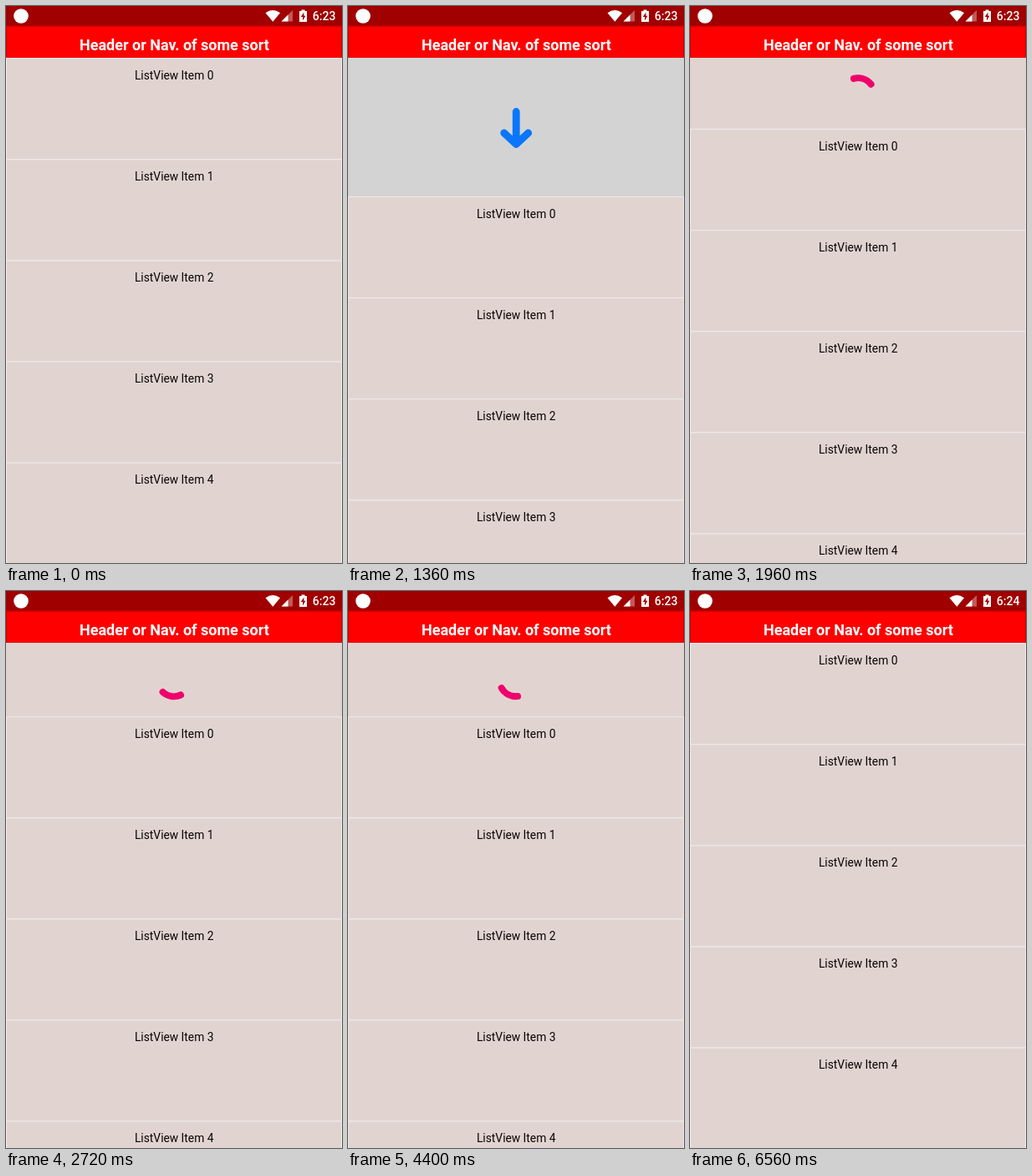
Animation, 402 px wide and 667 px high, one loop 6.6 s. Source, as an HTML page:

```html
<!DOCTYPE html>
<html lang="en">
<head>
<meta charset="utf-8">
<title>Pull to refresh</title>
<style>
  html, body { margin: 0; width: 100%; height: 100%; overflow: hidden; background: #e1d4d0; }
  svg { display: block; width: 402px; height: 667px; font-family: Roboto, "Open Sans", sans-serif; }
  .item rect { fill: #e1d4d0; stroke: #f1ecea; }
  .item text { font-size: 13.8px; text-anchor: middle; fill: #0a0404; }
  .spinner { fill: none; stroke: #ee006c; stroke-width: 8; stroke-linecap: round; }
  .arrow { fill: none; stroke: #0a76fc; stroke-width: 8.8; stroke-linecap: round; stroke-linejoin: round; }
</style>
</head>
<body>
<svg viewBox="0 0 402 667">
  <rect id="backdrop" width="402" height="667"/>
  <path id="arrow" class="arrow" d="M0-20V18M-14.5 5.5L0 19L14.5 5.5"/>
  <path id="spinner" class="spinner"/>
  <g id="list"></g>

  <rect width="402" height="62" fill="#d00000"/>
  <rect x="1" y="25" width="400" height="36.5" fill="#ff0000"/>
  <rect width="402" height="23.5" fill="#a00000"/>
  <text x="201.4" y="53.3" font-size="18" font-weight="700" text-anchor="middle" fill="#fff">Header or Nav. of some sort</text>

  <g fill="#fff">
    <circle cx="18" cy="12" r="8.8"/>
    <path d="M310.5 8.2Q319.3 1.8 328 8.2L319.3 18.8Z"/>
    <path d="M343 5V18.5H329.5Z" opacity=".35"/>
    <path d="M337.5 10.5V18.5H329.5Z"/>
    <path d="M351 6H353.5V4.5H357.5V6H360V19H351Z"/>
    <path d="M356.4 7.5L352.8 13H355V17.4L358.4 11.8H356.4Z" fill="#a00000"/>
    <text id="clock" x="366.8" y="17.2" font-size="14" font-weight="500"></text>
  </g>
</svg>
<script>
const LOOP = 6600;
const LIST_TOP = 62.2;
const ROW = 121.1;
const REFRESH_START = 1480;
const REFRESH_END = 6200;
const MINUTE_CHANGE = 5000;

const byId = id => document.getElementById(id);
const [backdrop, arrow, spinner, list, clock] =
  ["backdrop", "arrow", "spinner", "list", "clock"].map(byId);

list.innerHTML = Array.from({ length: 5 }, (_, i) => `
  <g class="item" transform="translate(0 ${i * ROW})">
    <rect x=".5" y=".5" width="401" height="${ROW}"/>
    <text x="201.2" y="25.8">ListView Item ${i}</text>
  </g>`).join("");

const easeInOut = p => (1 - Math.cos(Math.PI * p)) / 2;

// Pull distance: [time, offset]
const pullKeys = [
  [0, 0], [720, 0], [1300, 165.8], [REFRESH_START, 165.8],
  [1920, 84.8], [1960, 84.8], [2080, 88], [REFRESH_END, 88], [6520, 0], [LOOP, 0]
];

function pullAt(t) {
  const i = pullKeys.findIndex(([time]) => time > t);
  const [t0, y0] = pullKeys[i - 1];
  const [t1, y1] = pullKeys[i];
  return y0 + (y1 - y0) * easeInOut((t - t0) / (t1 - t0));
}

function arcPath(radius, sweep) {
  const half = sweep * Math.PI / 360;
  const x = radius * Math.cos(half), y = radius * Math.sin(half);
  return `M${x} ${-y}A${radius} ${radius} 0 0 1 ${x} ${y}`;
}
spinner.setAttribute("d", arcPath(20, 66));

function show(node, visible) {
  node.setAttribute("visibility", visible ? "visible" : "hidden");
}

function render(t) {
  const pull = pullAt(t);
  const refreshing = t >= REFRESH_START && t < REFRESH_END;
  const pulling = t < REFRESH_START && pull > 0;

  list.setAttribute("transform", `translate(0 ${LIST_TOP + pull})`);
  backdrop.setAttribute("fill", pulling ? "#d3d3d3" : "#e1d4d0");
  arrow.setAttribute("transform", `translate(201.2 ${LIST_TOP + pull / 2 + 1.4})`);
  show(arrow, pulling);

  const angle = t * 360 / 1600 - 153;
  spinner.setAttribute("transform", `translate(201 106.2) rotate(${angle})`);
  show(spinner, refreshing);

  clock.textContent = t < MINUTE_CHANGE ? "6:23" : "6:24";
}

const start = performance.now();
function tick(now) {
  render(Math.max(0, now - start) % LOOP);
  requestAnimationFrame(tick);
}
render(0);
requestAnimationFrame(tick);
</script>
</body>
</html>
```
